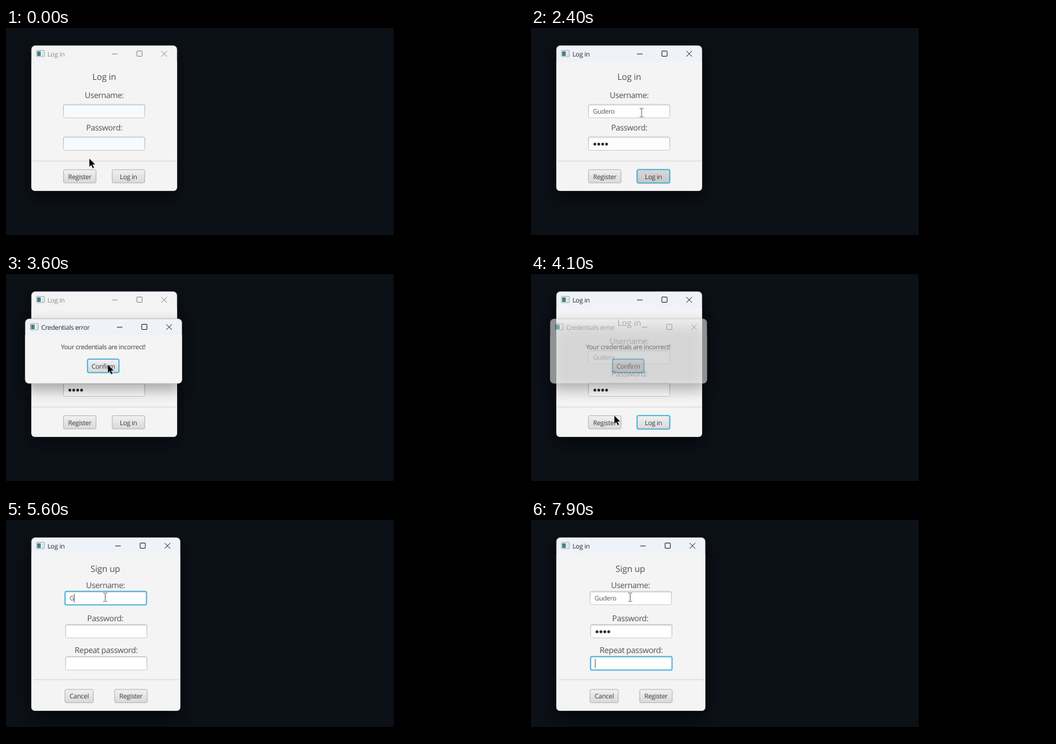
These frames come from a looping animation (798 by 336 pixels, 8000 ms). An HTML page:

```html
<!DOCTYPE html>
<html lang="en">
<head>
<meta charset="utf-8">
<title>Log in and sign up</title>
<style>
html, body { margin: 0; width: 100%; height: 100%; overflow: hidden; background: #000; }
svg { display: block; }
text { font: 10.1px "Open Sans", "Noto Sans", sans-serif; letter-spacing: -.03em; fill: #3c3c3c; text-rendering: geometricPrecision; }
.mid { text-anchor: middle; }
.label { font-size: 12.4px; fill: #505050; }
.heading { font-size: 13.4px; letter-spacing: -.01em; fill: #505050; }
.entry { font-size: 10px; fill: #555; }
</style>
</head>
<body>
<svg width="798" height="336" viewBox="0 0 798 336">
  <defs>
    <linearGradient id="button" x2="0" y2="1"><stop stop-color="#f1f1f1"/><stop offset="1" stop-color="#d9d9d9"/></linearGradient>
    <linearGradient id="pressed" x2="0" y2="1"><stop stop-color="#d8d8d8"/><stop offset="1" stop-color="#c6c6c6"/></linearGradient>
    <linearGradient id="edge" x2="0" y2="1"><stop stop-color="#b2b2b2"/><stop offset="1" stop-color="#cecece"/></linearGradient>
    <filter id="blur" x="-30%" y="-50%" width="160%" height="200%"><feGaussianBlur stdDeviation="11"/></filter>
  </defs>
  <rect width="596" height="319" fill="#0c1017"/>
  <g id="stage"></g>
</svg>
<script>
const LOOP = 8000, STEP = 100;
const NAME = 'Gudero';
const stage = document.getElementById('stage');
const pen = document.createElement('canvas').getContext('2d');

// Last value whose start time has been reached; keys are [time, value].
const hold = (t, keys) => keys.reduce((value, key) => t >= key[0] ? key[1] : value, keys[0][1]);

// Position between keys [time, x, y].
function along(t, keys) {
  const i = keys.findIndex(key => key[0] > t);
  if (i < 0) return keys[keys.length - 1].slice(1);
  if (i === 0) return keys[0].slice(1);
  const [a, b] = [keys[i - 1], keys[i]];
  const k = (t - a[0]) / (b[0] - a[0]);
  return [a[1] + (b[1] - a[1]) * k, a[2] + (b[2] - a[2]) * k];
}

const text = (x, y, str, cls = '', extra = '') => `<text x="${x}" y="${y}" class="${cls}" ${extra}>${str}</text>`;

const rect = (x, y, w, h, rx, extra) => `<rect x="${x}" y="${y}" width="${w}" height="${h}" rx="${rx}" ${extra}/>`;

const focusRing = (x, y, w, h) =>
  rect(x - 1, y - 1, w + 2, h + 2, 3, 'fill="none" stroke="#9fd8ee" stroke-width="1" opacity=".8"') +
  rect(x, y, w, h, 2, 'fill="none" stroke="#35a9d6" stroke-width="1.3"');

function textWidth(str) {
  pen.font = '10px "Open Sans", "Noto Sans", sans-serif';
  return pen.measureText(str).width - .3 * str.length;
}

const shadow = (x, y, w, h, opacity) => rect(x, y + 9, w, h, 8, `filter="url(#blur)" opacity="${opacity}"`);

function windowFrame(x, y, w, h, title, active) {
  const ink = active ? '#222' : '#8a8a8a', right = x + w, mid = y + 12.5;
  return rect(x, y, w, h, 6, `fill="${active ? '#eff2f8' : '#f3f3f3'}" stroke="#8c8e92" stroke-width=".5"`) +
    `<path d="M${x} ${y + 25}h${w}v${h - 31}q0 6 -6 6h${12 - w}q-6 0 -6 -6z" fill="#f4f4f4"/>` +
    rect(x + 8, y + 7.5, 12, 9.5, .5, 'fill="#f8f8f8" stroke="#a2a6aa" stroke-width="1"') +
    rect(x + 9, y + 9, 5.5, 7, 0, 'fill="#39848a"') +
    rect(x + 16, y + 9, 3, 7, 0, 'fill="#dfe3e6"') +
    text(x + 24.7, y + 16.5, title, '', `style="fill:${active ? '#2a2a2a' : '#8a8a8a'}"`) +
    `<g fill="none" stroke="${ink}"><path d="M${right - 100} ${mid + .5}h8.5M${right - 24} ${mid - 4}l8.5 8.5m0 -8.5l-8.5 8.5"/>` +
    rect(right - 61.8, mid - 4, 8, 8, .5, '') + '</g>';
}

function button(x, y, w, label, { focus, pressed } = {}) {
  return rect(x, y, w, 20.5, 2, `fill="url(#${pressed ? 'pressed' : 'button'})" stroke="#b4b4b4" stroke-width="1"`) +
    (focus ? focusRing(x, y, w, 20.5) : '') +
    text(x + w / 2, y + 14.2, label, 'mid');
}

// A field holds a string, or a number of masked characters.
function field(x, y, content, { focus, caret = true, fill = '#fff' } = {}) {
  const masked = typeof content === 'number', start = x + 6.8;
  let out = rect(x, y, 125, 20.5, 2, `fill="${fill}" stroke="url(#edge)"`) +
    `<path d="M${x + 1} ${y + 1.2}h123" stroke="#e4e6e8"/>`;
  if (focus) out += focusRing(x, y, 125, 20.5);
  if (masked) {
    for (let i = 0; i < content; i++) out += `<circle cx="${start + 3 + 6 * i}" cy="${y + 11}" r="2.2" fill="#2c2c2c"/>`;
  } else out += text(start, y + 14, content, 'entry');
  if (focus && caret) {
    const end = start + (masked ? 6 * content : textWidth(content)) + .3;
    out += `<path d="M${end} ${y + 3.5}v13.5" stroke="#444" stroke-width=".9"/>`;
  }
  return out;
}

function pointer([x, y], beam) {
  return `<g transform="translate(${x} ${y})">` + (beam
    ? '<path d="M-3 -6.5h2.2l.8 .8l.8 -.8h2.2M0 -5.7v11.4M-3 6.5h2.2l.8 -.8l.8 .8h2.2" fill="none" stroke="#555" stroke-width=".9"/>'
    : '<path d="M0 0v13.2l3 -2.8l2.3 4.9l2.3 -1.1l-2.3 -4.7h4.2z" stroke="#fff" stroke-width=".4"/>') + '</g>';
}

function logIn(t) {
  const focus = hold(t, [[0, ''], [600, 'user'], [1700, 'pass'], [2300, 'login'], [2800, ''], [4100, 'login'], [4500, 'register']]);
  const typed = hold(t, [[0, 0], [1200, 1], [1300, 3], [1400, 4], [1500, 6]]);
  const dots = hold(t, [[0, 0], [1900, 1], [2000, 3], [2200, 4]]);
  const active = focus !== '';
  return shadow(39, 27, 224, 224, active ? .65 : .5) +
    windowFrame(39, 27, 224, 224, 'Log in', active) +
    text(151, 80, 'Log in', 'heading mid') +
    text(151, 108, 'Username:', 'label mid') +
    field(88.4, 118, NAME.slice(0, typed), { focus: focus === 'user', fill: typed ? '#fdfefe' : '#f7fbfe' }) +
    text(151, 158, 'Password:', 'label mid') +
    field(88.4, 168, dots, { focus: focus === 'pass', fill: dots ? '#fcfdfe' : '#f7fbfe' }) +
    '<path d="M40 205h222.5" stroke="#d2d2d2"/>' +
    button(88.4, 218.3, 50, 'Register', { focus: focus === 'register', pressed: t >= 4500 }) +
    button(163.3, 218.3, 50, 'Log in', { focus: focus === 'login', pressed: t >= 2400 && t < 2800 });
}

function errorDialog(t) {
  const opacity = hold(t, [[0, 0], [2800, .5], [2900, 1], [4100, .58], [4200, .15], [4300, 0]]);
  if (!opacity) return '';
  const scale = t < 2900 ? .95 : 1;
  return shadow(29.5, 69, 241, 100, .34 * Math.min(1, opacity * 1.5)) +
    `<g opacity="${opacity}" transform="translate(150 119) scale(${scale}) translate(-150 -119)">` +
    windowFrame(29.5, 69, 241, 99.5, 'Credentials error', t < 4100) +
    text(149.5, 116.3, 'Your credentials are incorrect!', 'mid', 'style="font-size:10px"') +
    button(125.5, 131.3, 48, 'Confirm', { focus: true, pressed: t >= 4000 }) + '</g>';
}

function signUp(t) {
  const focus = hold(t, [[0, 'user'], [7100, 'pass'], [7900, 'repeat']]);
  const typed = hold(t, [[0, 0], [5600, 1], [5800, 2], [5900, 3], [6000, 4], [6100, 5], [6200, 6]]);
  const dots = hold(t, [[0, 0], [7200, 1], [7300, 2], [7400, 3], [7600, 4]]);
  return shadow(39, 27, 229, 267, .65) +
    windowFrame(39, 27, 229, 267, 'Log in', true) +
    text(152.7, 80, 'Sign up', 'heading mid') +
    text(153, 104.7, 'Username:', 'label mid') +
    field(90.9, 110.2, NAME.slice(0, typed), { focus: focus === 'user', caret: t < 6700 }) +
    text(152.7, 156, 'Password:', 'label mid') +
    field(91.7, 161.3, dots, { focus: focus === 'pass' }) +
    text(154, 205.3, 'Repeat password:', 'label mid') +
    field(91.7, 210.7, 0, { focus: focus === 'repeat' }) +
    '<path d="M43 246h223" stroke="#d2d2d2"/>' +
    button(90.7, 261.1, 43.5, 'Cancel') +
    button(167.1, 261.1, 50, 'Register');
}

const route = [
  [0, 128, 201], [100, 142, 182], [200, 172, 142], [300, 183, 102], [400, 170, 130.5],
  [2700, 170, 130.5], [2800, 170, 131.5], [3300, 170, 131.5], [3700, 152, 142],
  [4000, 152, 142], [4100, 128, 218], [4600, 128, 218], [4800, 140, 168], [5000, 152.5, 119]
];

function draw(t) {
  const beam = (t >= 400 && t < 2800) || t >= 5000;
  stage.innerHTML = (t < 4600 ? logIn(t) + errorDialog(t) : signUp(t)) + pointer(along(t, route), beam);
}

let shown = -1;
const begin = performance.now();
function tick(now) {
  const t = Math.floor(Math.max(0, now - begin) % LOOP / STEP) * STEP;
  if (t !== shown) draw(shown = t);
  requestAnimationFrame(tick);
}
draw(0);
requestAnimationFrame(tick);
</script>
</body>
</html>
```
